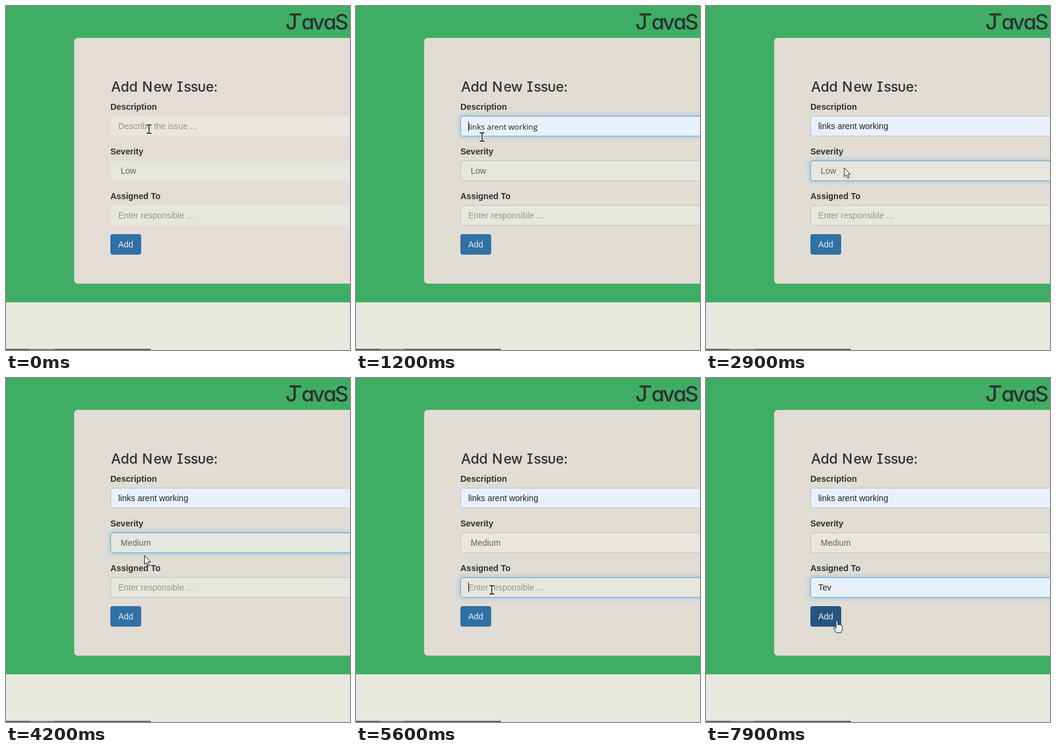
An HTML page that plays this animation: 570x570 px, repeating every 8000 ms.

```html
<!DOCTYPE html>
<html lang="en">
<head>
<meta charset="utf-8">
<title>Add New Issue</title>
<style>
html, body { margin: 0; width: 100%; height: 100%; overflow: hidden; }
body { position: relative; background: #e8e8df; color: #2d3133; font: 14px/20px "Liberation Sans", Arial, sans-serif; }
div, svg { position: absolute; box-sizing: border-box; white-space: pre; }
#hero { left: 0; top: 0; width: 570px; height: 491px; background: #3fae64; }
#panel { left: 113px; top: 53px; width: 520px; height: 407px; border-radius: 6px; box-shadow: 0 0 1px #c5d2bd; }
#edge { left: 0; top: 568px; width: 240px; height: 2px; background: linear-gradient(90deg, #626061 40px, #8b8989 40px 80px, #626061 80px); }
.label { left: 173px; font-weight: bold; }
.field { left: 173px; width: 460px; height: 34px; padding: 6px 12px; border: 1px solid #c5c2b8; border-radius: 4px; background: #e8e7df; color: #96948d; }
.field.filled { background: #e8f0fc; color: #202326; border-color: #b9bfc6; }
.field.preview { font: 13px/22px "Open Sans", sans-serif; }
.field.focus { border-color: #66a9dc; box-shadow: inset 0 1px 1px rgba(0,0,0,.075), 0 0 8px rgba(102,175,233,.65); }
.field.loading { border-color: #e4e1d9; }
#severity { padding-left: 16px; color: #62625d; }
#add { left: 173px; top: 378px; width: 51px; height: 34px; padding: 7px 13px; border-radius: 4px; color: #eceff0; }
#caret { width: 1px; height: 17px; background: #222; }
svg { left: 0; top: 0; }
.hand { font-family: Inter, sans-serif; font-feature-settings: "cv11", "cv08", "cv06"; fill: #2d3133; }
</style>
</head>
<body>
<div id="hero"></div>
<div id="panel"></div>
<div id="edge"></div>
<div class="label" style="top:157px">Description</div>
<div class="label" style="top:231px">Severity</div>
<div class="label" style="top:305px">Assigned To</div>
<div class="field" id="description" style="top:182px"></div>
<div class="field" id="severity" style="top:256px"></div>
<div class="field" id="assigned" style="top:330px"></div>
<div id="add">Add</div>
<div id="caret"></div>
<svg width="570" height="570">
  <g class="hand">
    <text x="463 489.5 508 526 545" y="38.5" font-size="35" font-weight="500">JavaS</text>
    <path d="M471 14H488" stroke="#2d3133" stroke-width="3.4" stroke-linecap="round"/>
    <text y="142" font-size="23" font-weight="450" x="174 190 204 218 225.5 244.5 257 275 283 294.5 306 317.5 331 344">Add New Issue:</text>
  </g>
  <g id="cursor">
    <g id="ibeam" fill="none">
      <path d="M-4-7H-1L0-6L1-7H4M0-6V6M-4 7H-1L0 6L1 7H4" stroke="#f4f4f0" stroke-width="3.6"/>
      <path d="M-4-7H-1L0-6L1-7H4M0-6V6M-4 7H-1L0 6L1 7H4" stroke="#111" stroke-width="1.4"/>
    </g>
    <path id="arrow" d="M0 0V15L3.4 11.8L6 17.5L8.3 16.5L5.8 11H10.3Z" fill="#f4f4f0" stroke="#222"/>
    <path id="pointer" d="M-1.5 1Q0-1 1.5 1V7Q3 5.5 4.3 7.2Q6 6 7 8Q9 7.4 9 9.5V14Q8.5 17 6.5 20H-1L-5.5 13Q-6.5 10.5-4 11L-1.5 13Z" fill="#f0efea" stroke="#222"/>
  </g>
</svg>
<script>
const $ = id => document.getElementById(id);
const LOOP = 8000, TICK = 100;

// time, x, y of the cursor hot spot
const path = [
  [0, 237, 204], [300, 206, 202], [400, 206, 202], [500, 197, 201], [800, 197, 201],
  [1200, 209, 217], [2200, 209, 217], [2800, 229, 268], [4100, 229, 268],
  [4300, 230, 320], [4500, 230, 320], [4900, 237, 337], [5400, 225, 351],
  [6200, 225, 351], [6300, 222, 366], [7200, 222, 366], [7800, 217, 402], [LOOP, 217, 402]
];

function cursorAt(t) {
  const i = path.findIndex(p => p[0] > t);
  const [t0, x0, y0] = path[i - 1], [t1, x1, y1] = path[i];
  const k = (t - t0) / (t1 - t0), e = k * k * (3 - 2 * k);
  return [x0 + (x1 - x0) * e, y0 + (y1 - y0) * e];
}

// An input shows its hint, then a suggestion preview, then the accepted value.
function drawInput(id, t, hint, value, previewAt, acceptAt, focused) {
  const el = $(id), filled = t >= previewAt;
  el.textContent = filled ? value : hint;
  el.classList.toggle("filled", filled);
  el.classList.toggle("preview", filled && t < acceptAt);
  el.classList.toggle("focus", focused);
}

function drawCaret(t) {
  const spot =
    t >= 700 && t < 1600 ? [186, 191] :
    t >= 1600 && t < 1800 ? [302, 191] :
    t >= 5400 && t < 6500 ? [186, 338] :
    t >= 6500 && t < 6700 ? [212, 338] : null;
  $("caret").style.display = spot ? "block" : "none";
  if (spot) [$("caret").style.left, $("caret").style.top] = spot.map(v => v + "px");
}

function drawCursor(t) {
  const [x, y] = cursorAt(t);
  const overButton = y >= 378;
  const kind = overButton ? "pointer" : y < 220 || y > 328 ? "ibeam" : "arrow";
  for (const id of ["ibeam", "arrow", "pointer"])
    $(id).style.display = id === kind ? "inline" : "none";
  $("cursor").setAttribute("transform", `translate(${x.toFixed(1)} ${y.toFixed(1)})`);
  $("add").style.background = overButton ? "#28547f" : "#3170a5";
}

function draw(time) {
  const t = Math.floor(time % LOOP / TICK) * TICK;
  drawInput("description", t, "Describe the issue ...", "links arent working", 1000, 1600, t >= 700 && t < 2800);
  drawInput("assigned", t, "Enter responsible ...", "Tev", 6300, 6500, t >= 5400);
  $("severity").textContent = t < 4200 ? "Low" : "Medium";
  $("severity").classList.toggle("focus", t >= 2800 && t < 5400);
  for (const el of document.querySelectorAll(".field"))
    el.classList.toggle("loading", t < 100);
  $("panel").style.background = t < 700 ? "#e3ddd6" : "#e1ddd4";
  drawCaret(t);
  drawCursor(t);
  requestAnimationFrame(draw);
}
draw(0);
</script>
</body>
</html>
```
